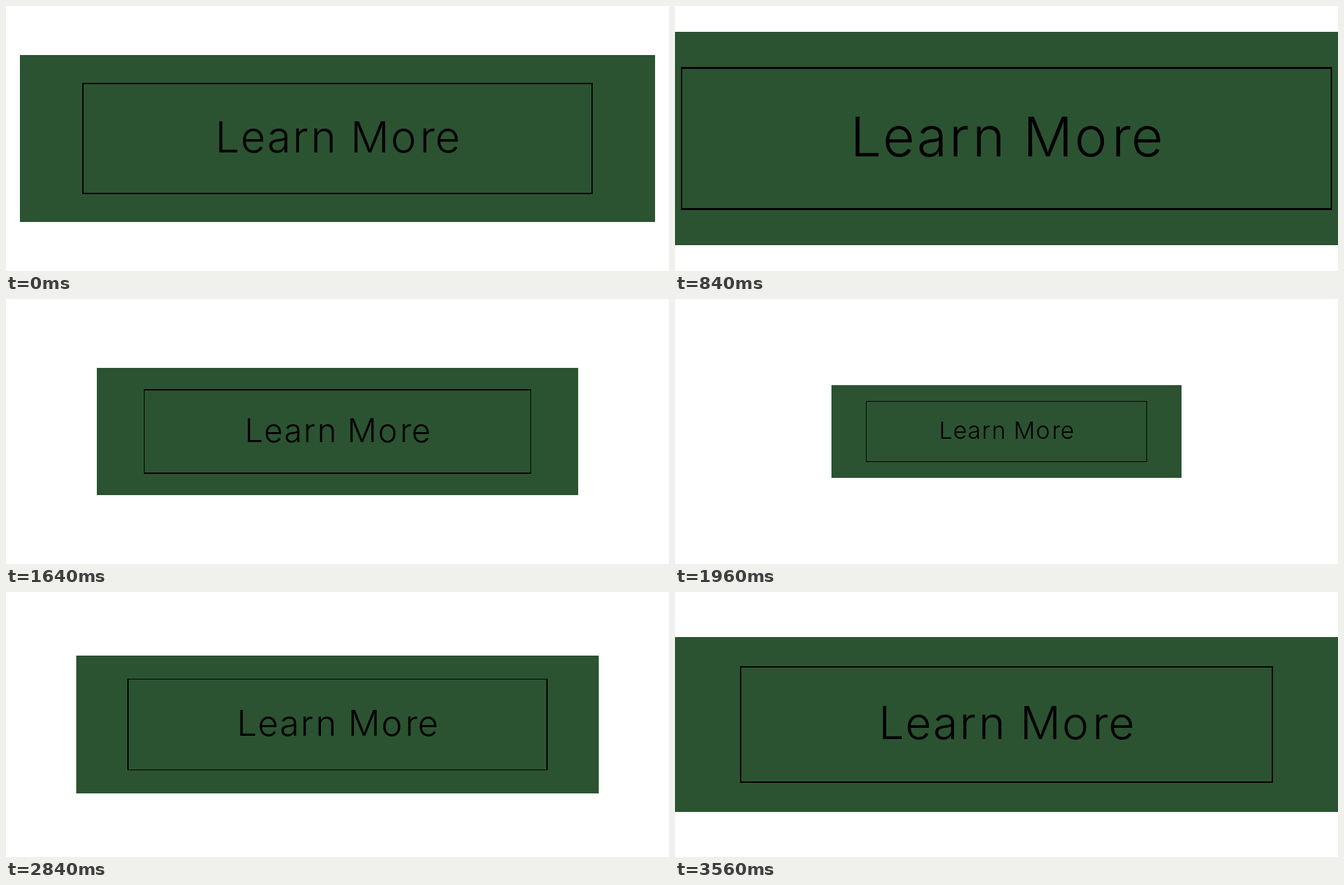
An HTML page for the animation above (7560 ms loop, 1000x400 px).

```html
<!DOCTYPE html>
<html lang="en">
<head>
<meta charset="utf-8">
<title>Learn More</title>
<style>
  html, body { margin: 0; height: 100%; overflow: hidden; background: #fff; }
  svg { display: block; width: 100%; height: 100%; }
  rect { shape-rendering: crispEdges; }
  text { font: 350 68px Inter, "Open Sans", sans-serif; text-anchor: middle; }
</style>
</head>
<body>
<svg viewBox="-500 -200 1000 400">
  <g id="button">
    <rect x="-500" y="-132" width="1000" height="264" fill="#2b5331"/>
    <rect x="-401" y="-87" width="802" height="174" fill="none" stroke="#000" stroke-width="2"/>
    <!-- one centre per letter gives the wide, even spacing -->
    <text x="-173.5 -133 -92 -58.5 -22 3 51 104 142 173.5" y="21.7">Learn More</text>
  </g>
</svg>
<script>
  const LOOP = 7560, STEP = 40;
  // [step, scale]: linear in between, held after the last
  const keys = [[0, 0.958], [9, 1.52], [49, 0.528], [89, 1]];
  const button = document.getElementById("button");

  function scaleAt(step) {
    const i = keys.findIndex(([s]) => s > step);
    if (i < 0) return keys[keys.length - 1][1];
    const [s0, v0] = keys[i - 1], [s1, v1] = keys[i];
    return v0 + (v1 - v0) * (step - s0) / (s1 - s0);
  }

  function draw() {
    const step = Math.floor(performance.now() % LOOP / STEP);
    button.setAttribute("transform", `scale(${scaleAt(step)})`);
    requestAnimationFrame(draw);
  }
  draw();
</script>
</body>
</html>
```
